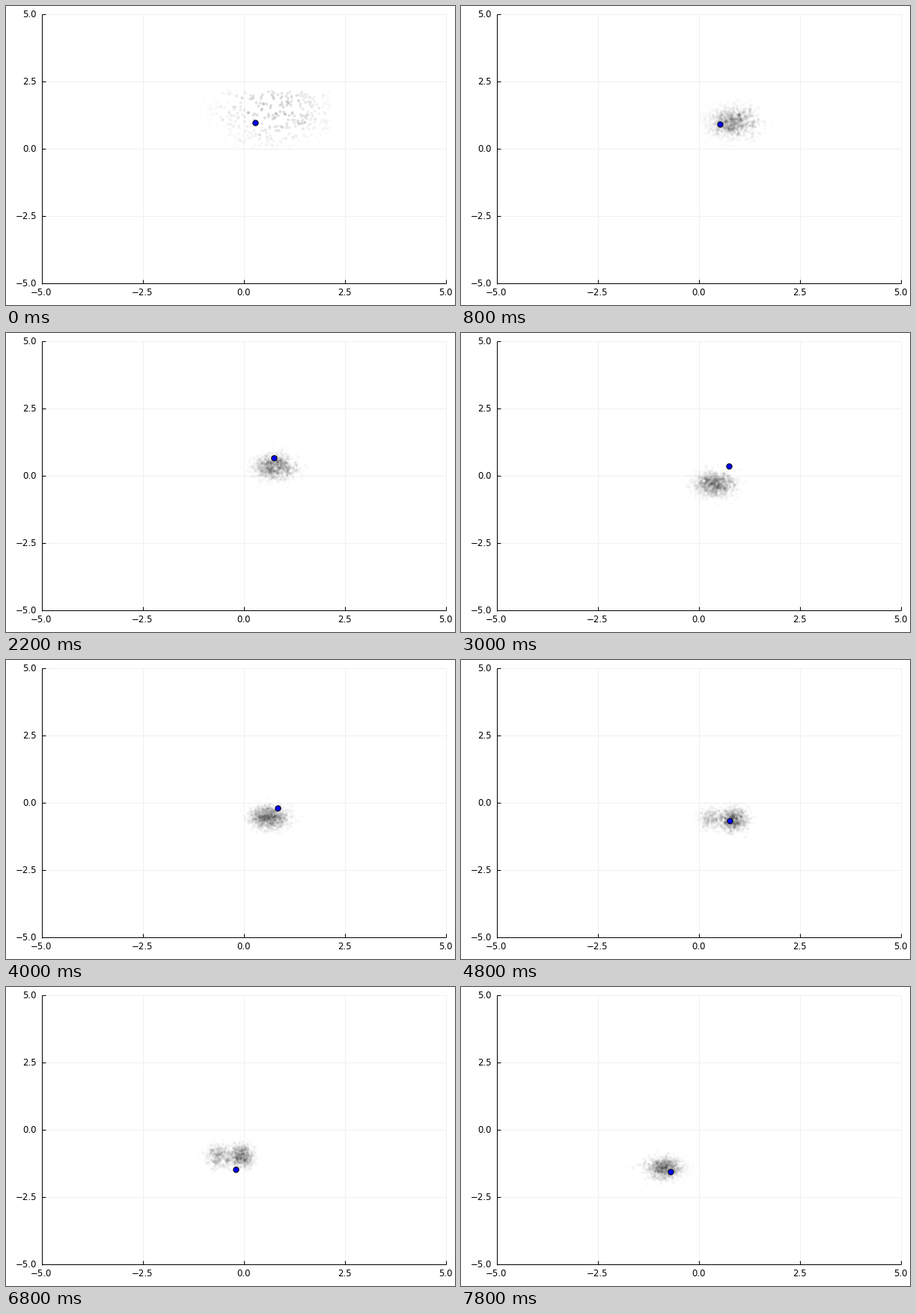
A matplotlib script for the animation above (8 s loop, 600x400 px).

```python
import numpy as np
import matplotlib.pyplot as plt
from matplotlib.animation import FuncAnimation

W, H, DPI = 600, 400, 100
FRAMES, STEP_MS = 40, 200
PX = 72 / DPI                      # one pixel in points
LEFT, RIGHT, TOP, BOTTOM = 48, 588, 11, 371

# Turning points of both paths, in axis units
TIMES = np.array([0, 8, 15, 24, 30, 34, 39])
BALL = np.array([(0.28, 0.99), (0.69, 0.86), (0.74, 0.385), (0.75, -0.635),
                 (0.18, -1.265), (-0.21, -1.445), (-0.705, -1.525)])
SWARM = np.array([(0.40, 1.08), (0.90, 0.80), (0.36, -0.29), (0.86, -0.61),
                  (0.66, -0.95), (-0.05, -0.96), (-0.80, -1.40)])


def to_px(x, y):
    return 318.3 + 54 * x, 191.8 - 36 * y


def along(points, i):
    """Smooth cubic curve through the points at frame i."""
    slopes = np.gradient(points, TIMES, axis=0)
    k = min(np.searchsorted(TIMES, i, side="right") - 1, len(TIMES) - 2)
    h = TIMES[k + 1] - TIMES[k]
    u = (i - TIMES[k]) / h
    ease = u * u * (3 - 2 * u)
    return (points[k] * (1 - ease) + points[k + 1] * ease
            + h * u * (1 - u) * ((1 - u) * slopes[k] - u * slopes[k + 1]))


def particles(i):
    rng = np.random.default_rng(100 + i)
    first, settle = np.exp(-i), np.exp(-i / 8)
    spread = np.array([0.25 + 0.14 * settle + 0.59 * first,
                       0.22 + 0.16 * settle + 0.25 * first])
    # the swarm starts as an even patch, then becomes a bell-shaped cloud
    if i == 0:
        z = rng.uniform(-1.75, 1.75, (420, 2))
    else:
        z = rng.normal(size=(1000, 2))
    centre = along(SWARM, i)
    pos = centre + z * spread

    # late in the run a third of the swarm drifts off to the left and back
    if i > 19:
        split = np.sin(np.pi * (i - 19) / 10) ** 2
        stray = rng.random(len(z)) < 0.33
        pos[stray, 0] -= 0.62 * split
        pos[:, 0] -= z[:, 0] * 0.08 * split

    # likelier particles are darker, ahead of the swarm's centre
    lean = np.array([0.35 * np.cos(np.pi * i / FRAMES), 0.42 * first])
    width = 0.5 + 0.25 * first
    d2 = (((pos - centre - lean) / width) ** 2).sum(axis=1)
    peak = 0.048 + 0.095 * np.exp(-i / 2)
    return pos, peak * np.exp(-d2 / 2)


fig = plt.figure(figsize=(W / DPI, H / DPI), dpi=DPI, facecolor="white")
ax = fig.add_axes([0, 0, 1, 1])
ax.set(xlim=(0, W), ylim=(H, 0))
ax.axis("off")


def line(x, y, color, z):
    ax.plot(x, y, color=color, lw=PX, zorder=z, solid_capstyle="butt")


def label(v, x, y, align):
    text = f"{v:.1f}".replace("-", "\u2212")
    ax.text(x, y, text, ha=align, va="baseline", fontsize=8.5,
            family="DejaVu Sans", color="black")


for v in np.linspace(-5, 5, 5):
    x, y = LEFT + 54 * (v + 5), TOP + 36 * (5 - v)
    line((x, x), (TOP, BOTTOM), "#f0f0f0", 1)
    line((LEFT, RIGHT), (y, y), "#f0f0f0", 1)
    line((x, x), (BOTTOM, BOTTOM - 5), "black", 2)
    line((LEFT, LEFT + 5), (y, y), "black", 2)
    label(v, x - 0.8, 387.3, "center")
    label(v, 41, y + 4.3, "right")
line((LEFT, LEFT), (TOP, BOTTOM + 1), "black", 2)
line((LEFT, RIGHT), (BOTTOM, BOTTOM), "black", 2)

cloud = ax.scatter([], [], s=(3.8 * PX) ** 2, linewidths=0, zorder=3)
ball, = ax.plot([], [], "o", ms=7.3 * PX, mfc="#0000ff", mec="black",
                mew=PX, zorder=4)


def draw(i):
    pos, alpha = particles(i)
    cloud.set_offsets(np.column_stack(to_px(*pos.T)))
    rgba = np.zeros((len(alpha), 4))
    rgba[:, 3] = alpha
    cloud.set_facecolors(rgba)
    x, y = to_px(*along(BALL, i))
    ball.set_data([x], [y])
    return cloud, ball


def init():
    return draw(0)


anim = FuncAnimation(fig, draw, frames=FRAMES, init_func=init,
                     interval=STEP_MS, repeat=True)
plt.show()
```
